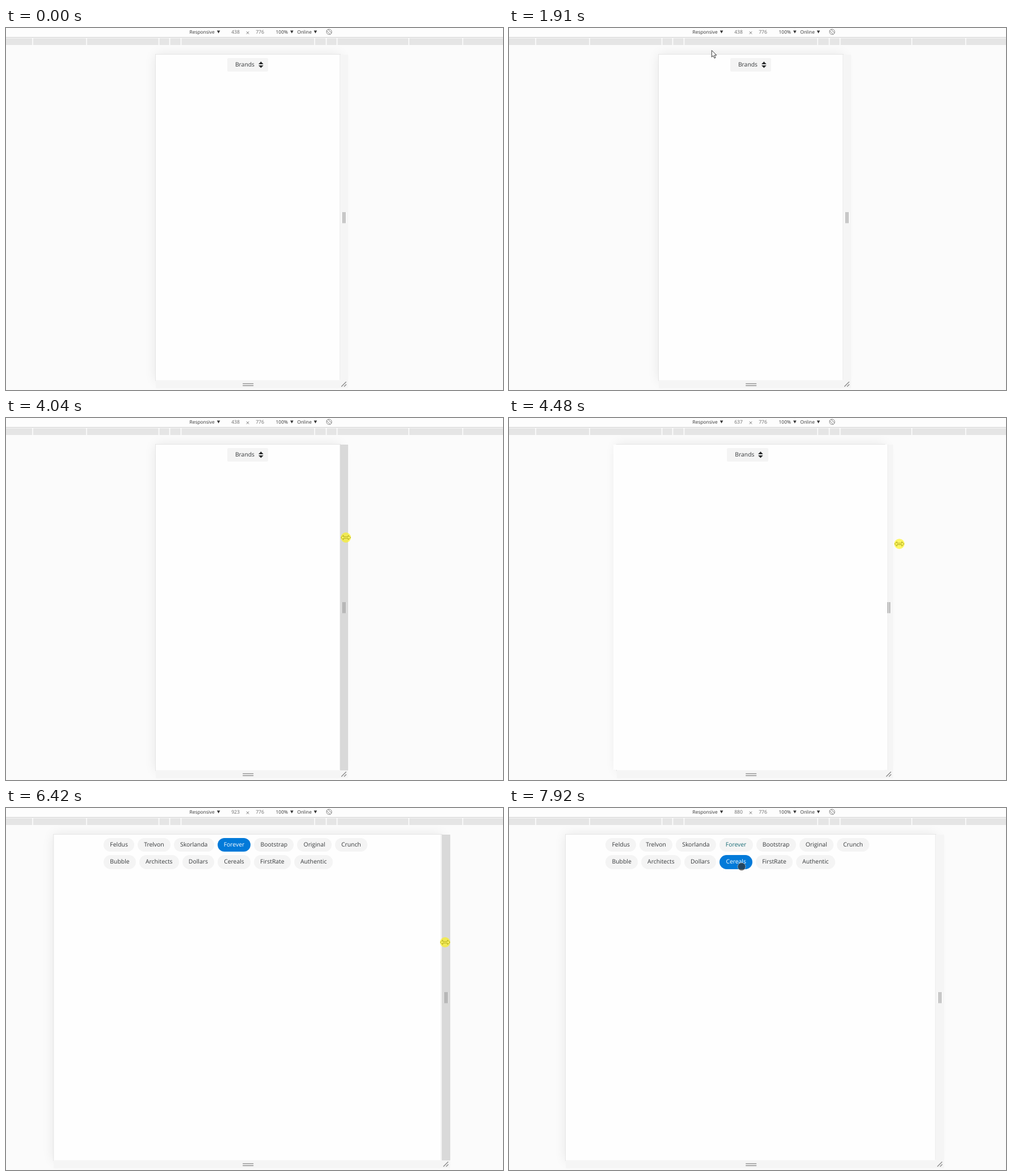
Animation, 876 px wide and 639 px high, one loop 8000 ms. Source, as an HTML page:

```html
<!DOCTYPE html>
<html lang="en">
<head>
<meta charset="utf-8">
<title>Responsive pills</title>
<style>
html, body { margin: 0; width: 100%; height: 100%; overflow: hidden; background: #fbfbfb; }
body { position: relative; font-family: "Open Sans", "Noto Sans", sans-serif; text-rendering: geometricPrecision; }
svg, div { position: absolute; }
svg { left: 0; top: 0; }
#frame { top: 46.5px; height: 575px; box-shadow: 0 0 0 1px #e6e6e6, 0 0 20px rgba(0,0,0,.09); }
#side { left: 100%; top: 0; width: 14.5px; height: 575px; background: #f5f5f5; }
#base { left: 0; right: -14.5px; top: 575px; height: 14.5px; background: #f5f5f5; }
#page { top: 46.5px; height: 574.5px; background: #fefefe; box-shadow: inset -1px 0 #eee; }
#pills { top: 6px; display: flex; flex-wrap: wrap; gap: 5.8px 6.05px; }
#pills span, #brands { background: #f4f4f4; color: #373a3c; font-size: 10.38px; line-height: 24.8px; white-space: nowrap; }
#pills span { padding: 0 11.15px; border-radius: 12.4px; }
#pills .on { background: #027ad9; color: #fff; }
#brands { top: 6px; width: 58.6px; padding-left: 14px; border-radius: 2.5px; }
#brands svg { left: 55px; top: 6.5px; }
</style>
</head>
<body>
<div id="frame"><div id="side"></div><div id="base"></div></div>
<div id="page">
  <div id="pills"></div>
  <div id="brands">Brands<svg width="9" height="12" fill="#292b2c"><path d="M0 5L4.4 .3 8.8 5ZM0 7H8.8L4.4 11.6Z"/></svg></div>
</div>
<svg width="876" height="639">
  <rect width="876" height="16" fill="#fdfdfd"/>
  <path d="M0 16.5H876" stroke="#cdcdcd"/>
  <rect y="18" width="876" height="12" fill="#e5e5e5"/>
  <path d="M47 18v12m95-12v12m127.5-12v12m19-12v12m20-12v12m235.5-12v12m20.5-12v12m19-12v12M710 18v12m95-12v12" stroke="#fdfdfd" stroke-width="1.6"/>
  <g font-size="8.35" fill="#333">
    <text x="323.6" y="10.2">Responsive</text>
    <text x="475.6" y="10.2">100%</text>
    <text x="513.2" y="10.2">Online</text>
    <path d="M371.8 4.6h5.6l-2.8 5zM501 4.6h5.6l-2.8 5zM542.6 4.6h5.6l-2.8 5z"/>
  </g>
  <g font-size="8.7" fill="#6c6c6c" text-anchor="middle">
    <text id="width" x="404.6" y="10.3"></text>
    <text x="447.6" y="10.3">776</text>
  </g>
  <path d="M423.8 6.2l4.4 4.4m0-4.4l-4.4 4.4" stroke="#666" stroke-width=".9"/>
  <g transform="translate(569.5 6.8)" fill="none" stroke="#777" stroke-width=".9">
    <circle r="4.6"/>
    <rect x="-1.7" y="-4.6" width="3.4" height="9.2" fill="#fdfdfd" transform="rotate(-45)"/>
  </g>
  <path d="M417.2 627.8h19m-19 3.5h19" stroke="#858585" stroke-width="1.2"/>
  <g id="grips" stroke="#858585" stroke-width="1.2">
    <path d="M5.6 325v19.5M8.7 325v19.5"/>
    <path d="M2.5 633l8.5-8.5M7.3 633l4-4"/>
  </g>
  <g id="cursor" stroke="#222" stroke-width=".9" fill="#fff">
    <path id="arrow" d="M.3 .5V12.3L3 9.8 5 14.3 7 13.4 5.1 9H8.8Z"/>
    <path id="resize" d="M-8.4 0L-4.2-4V-1.2H4.2V-4L8.4 0 4.2 4V1.2H-4.2V4Z"/>
    <circle id="touch" r="7" fill="rgba(50,50,50,.72)" stroke="rgba(255,255,255,.5)"/>
    <circle id="press" r="9" fill="rgba(255,244,0,.6)" stroke="none"/>
  </g>
</svg>
<script>
const LOOP = 8000, SCALE = .7415, CENTER = 426.2;
const GRAB = { time: 4090, x: 599 }, DROP = 6900;
const LABEL_LAG = 43, PAGE_LAG = 27;
const $ = id => document.getElementById(id);

const smooth = k => k * k * (3 - 2 * k);
const easeOut = k => 1 - (1 - k) ** 3;

// pointer strokes; bend bows the stroke sideways by that many pixels
const home = { x: 747, y: 583 }, strokes = [];
const move = (start, end, x, y, bend = 0, ease = smooth) => strokes.push({ start, end, x, y, bend, ease });
move(200, 530, 395, 319, -40);
move(700, 1380, 422, 94, -24);
move(1610, 1910, 357, 39, -15);
move(1980, 2530, 522, 176, -20);
move(2710, 3250, 590, 210);
move(3250, 3540, 606, 211);
move(3560, 3730, GRAB.x, 211);
move(GRAB.time, 4950, 805, 237);
move(6238, 6744, 763, 237, 0, easeOut);
move(7060, 7300, 415, 104);
move(7530, 7680, 410, 103.5);

function pointer(t) {
  let from = home;
  for (const to of strokes) {
    if (t < to.start) break;
    if (t < to.end) {
      const k = to.ease((t - to.start) / (to.end - to.start));
      const dx = to.x - from.x, dy = to.y - from.y;
      const side = to.bend * Math.sin(Math.PI * k) / Math.hypot(dx, dy);
      return { x: from.x + dx * k - dy * side, y: from.y + dy * k + dx * side };
    }
    from = to;
  }
  return from;
}

// the device stays centred, so it grows twice as fast as the pointer moves
function deviceWidth(t) {
  const { x } = pointer(Math.min(DROP, Math.max(GRAB.time, t)));
  return Math.round(438 + 2 * (x - GRAB.x) / SCALE);
}

const names = "Feldus Trelvon Skorlanda Forever Bootstrap Original Crunch Bubble Architects Dollars Cereals FirstRate Authentic";
const pills = {};
for (const name of names.split(" ")) {
  const pill = pills[name] = document.createElement("span");
  pill.textContent = name;
  $("pills").append(pill);
}

function place(el, left, width) {
  el.style.left = left + "px";
  el.style.width = width + "px";
}

const show = (el, on) => { el.style.display = on ? "" : "none"; };

function draw(t) {
  const { x, y } = pointer(t);
  const width = deviceWidth(t - LABEL_LAG), w = width * SCALE;
  const left = CENTER - w / 2, right = CENTER + w / 2;
  const pageW = deviceWidth(t - PAGE_LAG) * SCALE;

  $("width").textContent = width;
  place($("frame"), left, w);
  place($("page"), CENTER - pageW / 2, pageW);
  $("grips").setAttribute("transform", `translate(${right} 0)`);
  const atSide = t > 2700 && x >= right && x < right + 19;
  $("side").style.background = atSide && x > right + 2 && x < right + 14.5 ? "#d9d9d9" : "";

  const wide = width >= 768, inner = (width >= 992 ? 930 : 690) * SCALE;
  show($("pills"), wide);
  show($("brands"), !wide);
  place($("pills"), w / 2 - inner / 2, inner);
  $("brands").style.left = w / 2 - 36.3 + "px";

  const picked = t >= 7850;
  pills.Forever.className = picked ? "" : "on";
  pills.Forever.style.color = picked ? "#1c6e78" : "";
  pills.Cereals.className = picked ? "on" : "";

  const pressed = t >= 4040 && t < 5280 || t >= 5950 && t < 6830;
  const resizing = pressed || atSide;
  const inPage = x > left && x < right && y > 46.5;
  show($("cursor"), t >= 200);
  show($("press"), pressed);
  show($("resize"), resizing);
  show($("touch"), !resizing && inPage);
  show($("arrow"), !resizing && !inPage);
  $("cursor").setAttribute("transform", `translate(${x} ${y})`);
}

const start = performance.now();
function tick() {
  draw((performance.now() - start) % LOOP);
  requestAnimationFrame(tick);
}
tick();
</script>
</body>
</html>
```
